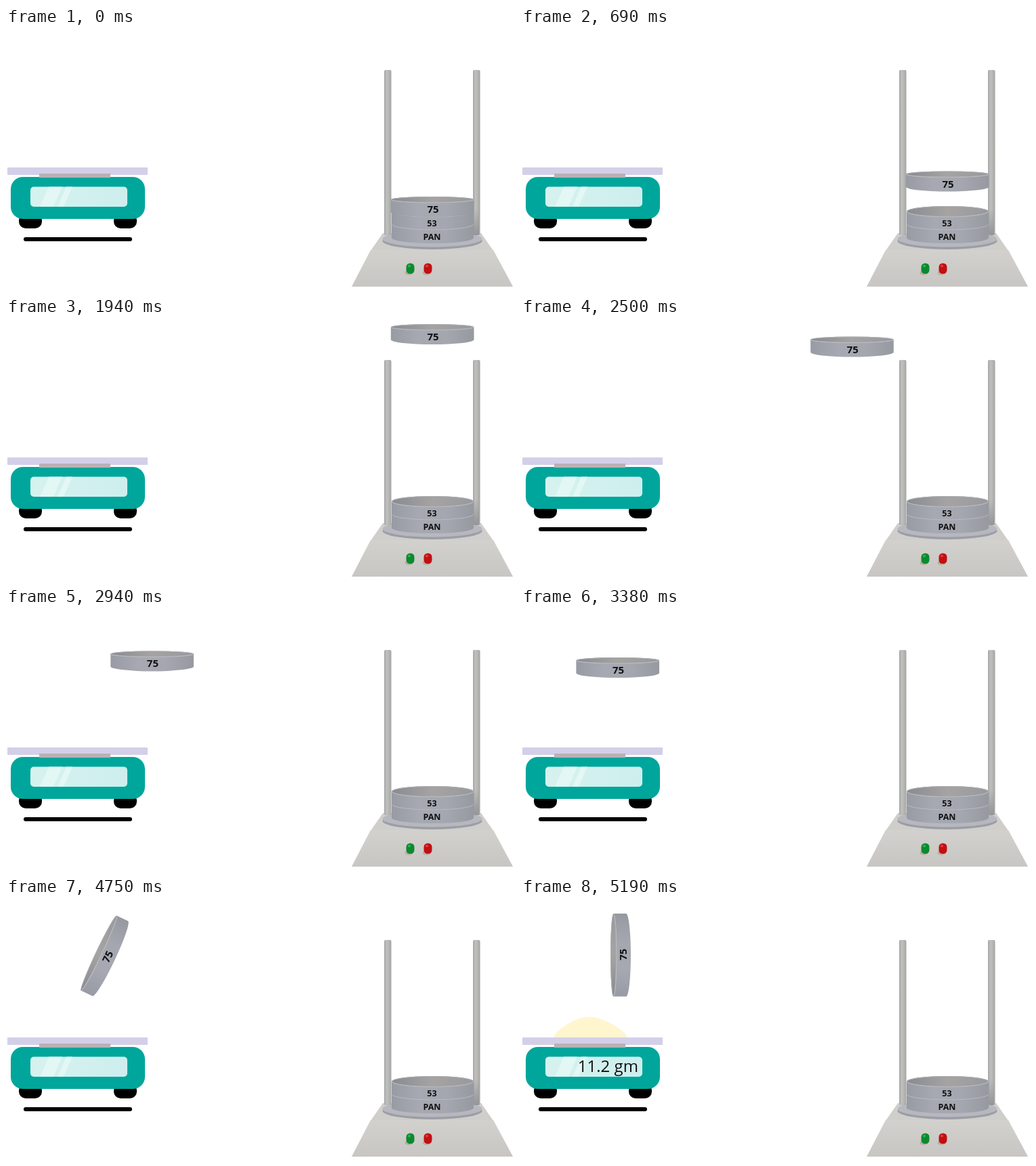
An HTML page with a canvas that plays this animation: 751 px wide and 387 px high, repeating every 5.35 s.

```html
<!DOCTYPE html>
<html lang="en">
<head>
<meta charset="utf-8">
<title>Sieve weighing</title>
<style>
  html, body { margin: 0; width: 100%; height: 100%; overflow: hidden; background: #fff; }
  canvas { display: block; }
</style>
</head>
<body>
<canvas id="stage" width="751" height="387"></canvas>
<script>
const ctx = document.getElementById('stage').getContext('2d');
const LOOP = 5350, STEP = 40;

function gradient(x0, y0, x1, y1, ...colors) {
  const g = ctx.createLinearGradient(x0, y0, x1, y1);
  colors.forEach((c, i) => g.addColorStop(i / (colors.length - 1), c));
  return g;
}

function polygon(fill, ...points) {
  ctx.beginPath();
  points.forEach(([x, y]) => ctx.lineTo(x, y));
  ctx.closePath();
  ctx.fillStyle = fill;
  ctx.fill();
}

function box(fill, x, y, w, h, radius = 0) {
  ctx.beginPath();
  ctx.roundRect(x, y, w, h, radius);
  ctx.fillStyle = fill;
  ctx.fill();
}

function oval(fill, x, y, rx, ry) {
  ctx.beginPath();
  ctx.ellipse(x, y, rx, ry, 0, 0, Math.PI * 2);
  ctx.fillStyle = fill;
  ctx.fill();
}

function label(text, x, y, size, weight = 700, align = 'center') {
  ctx.font = `${weight} ${size}px "Open Sans", "Noto Sans", sans-serif`;
  ctx.textAlign = align;
  ctx.fillStyle = '#111';
  ctx.fillText(text, x, y);
}

// Front wall between two downward-bulging edges.
function wall(x, r, top, topBulge, bottom, bottomBulge) {
  ctx.beginPath();
  ctx.ellipse(x, top, r, topBulge, 0, Math.PI, 0, true);
  ctx.lineTo(x + r, bottom);
  ctx.ellipse(x, bottom, r, bottomBulge, 0, 0, Math.PI);
  ctx.closePath();
  ctx.fillStyle = gradient(x - r, 0, x + r, 0, '#989ba4', '#a6a9b2', '#a4a7af', '#96999f');
  ctx.fill();
}

function rim(x, y, r, ry) {
  oval(gradient(x - r, 0, x + r, 0, '#888b90', '#a6a3a2', '#98999d'), x, y, r, ry);
  ctx.beginPath();
  ctx.ellipse(x, y, r - .5, ry - .5, 0, 0, Math.PI * 2);
  ctx.strokeStyle = '#acaeb4';
  ctx.lineWidth = 1;
  ctx.stroke();
}

function seam(x, y, r, ry) {
  ctx.beginPath();
  ctx.ellipse(x, y, r, ry, 0, 0, Math.PI);
  ctx.strokeStyle = '#b9bbc1';
  ctx.lineWidth = 1;
  ctx.stroke();
}

function lamp(x, color, shine) {
  oval('#b8aea2', x - 2, 361.5, 6, 3.5);
  box(color, x - 6, 347.5, 12, 15.5, 5.5);
  oval(shine, x - 1.5, 351.5, 2.2, 2);
}

function shaker() {
  polygon('#d0cecb', [556, 303], [701, 303], [719, 329], [538, 329]);
  polygon(gradient(0, 328, 0, 382, '#d3d1cd', '#c8c6c3'), [538, 328], [719, 328], [748, 382], [510, 382]);
  oval('#9c9ea6', 629, 314.5, 73.5, 12.5);
  oval('#b7b8bf', 629, 311.5, 73.5, 12);
  for (const x of [558, 689]) {
    box(gradient(x, 0, x + 10.5, 0, '#a0a5a6', '#bfc0be', '#b8b6b1', '#a2a3a4'), x, 62, 10.5, 244, 2);
  }
  box(gradient(0, 268, 0, 306, '#94959800', '#949598'), 690, 268, 8, 38, 2);
  rim(629.5, 271, 60.5, 8);
  wall(629.5, 60.5, 271, 8, 310, 8);
  seam(629.5, 271, 60, 8);
  seam(629.5, 290, 60, 8);
  label('53', 628.5, 292.7, 12.5);
  label('PAN', 628.5, 313, 12.5);
  lamp(596.5, '#0c8a30', '#2fae50');
  lamp(622.5, '#c20f12', '#e03a38');
}

function sieve({ x, y, angle }) {
  ctx.save();
  ctx.translate(x, y);
  ctx.rotate(angle);
  rim(-.3, -6.5, 61.3, 4.5);
  wall(-.3, 61.3, -6.5, 4.5, 12, 7);
  seam(-.3, -6.5, 61, 4.5);
  label('75', .5, 13, 15);
  ctx.restore();
}

function powder() {
  ctx.beginPath();
  ctx.moveTo(49, 207);
  ctx.lineTo(49, 203);
  ctx.bezierCurveTo(58, 191, 82, 175.5, 101, 175.5);
  ctx.bezierCurveTo(118, 175.5, 147, 191, 156, 203);
  ctx.lineTo(156, 207);
  ctx.fillStyle = '#fff5cf';
  ctx.fill();
}

function balance(loaded) {
  if (loaded) powder();
  box('#000', 19, 274, 34, 22, 10);
  box('#000', 159, 274, 34, 22, 10);
  box('#000', 26, 309, 160, 6, 3);
  box('#d4cfe8', 2, 206, 207, 11, 1);
  box('#00a69b', 7, 220, 198, 62, 18);
  box('#b9b1b6', 49, 215, 105, 6);
  box(gradient(36, 0, 179, 0, '#d6f2ef', '#cdeeed'), 36, 234.5, 143, 29.5, 5);
  for (const [x, w] of [[50, 20], [76, 9]]) {
    polygon('#e3f7f4', [x, 264], [x + w, 264], [x + w + 13, 234.5], [x + 13, 234.5]);
  }
  if (loaded) label('11.2 gm', 173, 257, 24, 400, 'right');
}

// Stepped progress of a move whose first and last changes are at the given times.
function progress(t, first, last, lead) {
  if (t < first) return 0;
  const held = first + Math.floor((t - first) / STEP) * STEP;
  return Math.min(1, (held - first + lead) / (last - first + lead));
}

function ease(u) {
  const half = v => .5 * (2 * v) ** 2.38;
  return u < .5 ? half(u) : 1 - half(1 - u);
}

function sievePose(t) {
  const lift = ease(progress(t, 250, 1730, 20));
  const carry = ease(progress(t, 1940, 3380, 20));
  const tip = progress(t, 3670, 5190, 40);
  return {
    x: 629.5 - 486.5 * carry,
    y: 260 - 240 * lift + 64 * carry,
    angle: -Math.PI / 2 * tip
  };
}

const start = performance.now();

function draw() {
  const t = (performance.now() - start) % LOOP;
  ctx.fillStyle = '#fff';
  ctx.fillRect(0, 0, 751, 387);
  shaker();
  balance(t >= 5190);
  sieve(sievePose(t));
  requestAnimationFrame(draw);
}

draw();
</script>
</body>
</html>
```
